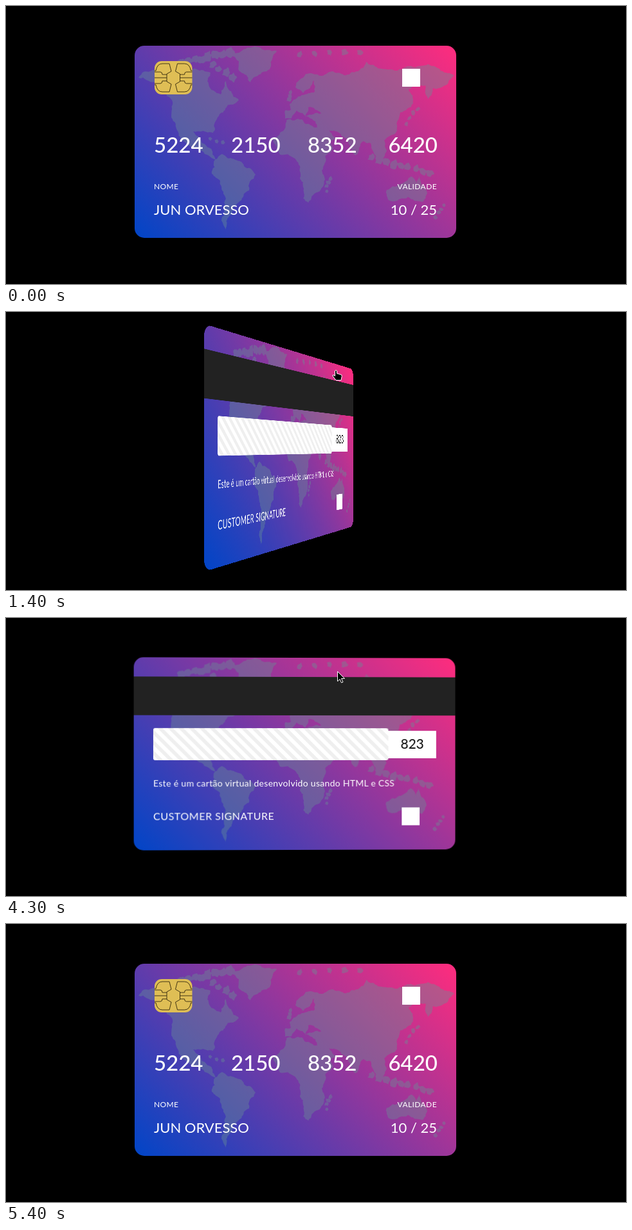
An HTML page that plays this animation: 964x434 px, repeating every 7200 ms.

```html
<!DOCTYPE html>
<html lang="pt">
<head>
<meta charset="utf-8">
<title>Cartão virtual</title>
<style>
  html, body { margin: 0; width: 100%; height: 100%; overflow: hidden; background: #000; }
  .stage { position: absolute; left: 0; top: 0; width: 964px; height: 434px; overflow: hidden; }
  .scene { position: absolute; left: 200px; top: 62px; width: 500px; height: 300px; perspective: 1000px; }
  .face {
    position: absolute; inset: 0; overflow: hidden; border-radius: 15px;
    backface-visibility: hidden;
    background: linear-gradient(45deg, #0045c7, #ff2c7d);
  }
  .face svg { position: absolute; left: 0; top: 0; }
  .strip {
    position: absolute; left: 30px; top: 110px; width: 365px; height: 50px; border-radius: 3px;
    background: repeating-linear-gradient(45deg, #fff 0 5.2px, #efefef 6px 10.8px, #fff 11.4px);
  }
  .cursor { position: absolute; left: 0; top: 0; }
  text { font-family: Lato, "Open Sans", sans-serif; fill: #fff; }
  .number { font-size: 33px; font-weight: 500; }
  .label { font-size: 12px; letter-spacing: .4px; }
  .value { font-size: 22px; }
  .end { text-anchor: end; }
</style>
</head>
<body>
<div class="stage">
  <div class="scene">
    <div class="face" id="front">
      <svg width="500" height="300" viewBox="200 62 500 300">
        <defs>
          <path id="map" fill="#688e94" opacity=".4"/>
          <path id="contacts" d="M231 101H233Q235 90 243 90H254L257 102 250 106V118L257 122 254 134H243Q235 134 233 123H231M231 103H240Q243 103 243 107H250M231 112H250M231 121H240Q243 121 243 117H250"/>
        </defs>
        <use href="#map"/>
        <rect x="231" y="86" width="58.5" height="52" rx="11" fill="#dfbe55"/>
        <g fill="none" stroke="#33280c" stroke-width=".9">
          <use href="#contacts"/>
          <use href="#contacts" transform="translate(520.5) scale(-1 1)"/>
        </g>
        <rect x="616" y="98" width="28" height="28" fill="#fff"/>
        <g class="number">
          <text x="230" y="229">5224</text>
          <text x="350" y="229">2150</text>
          <text x="469" y="229">8352</text>
          <text class="end" x="671" y="229">6420</text>
        </g>
        <text class="label" x="230" y="286">NOME</text>
        <text class="label end" x="670" y="286">VALIDADE</text>
        <text class="value" x="230" y="326">JUN ORVESSO</text>
        <text class="value end" x="670" y="326">10 / 25</text>
      </svg>
    </div>
    <div class="face" id="back">
      <svg width="500" height="300" viewBox="200 62 500 300">
        <use href="#map"/>
        <rect x="200" y="92" width="500" height="60" fill="#222"/>
        <rect x="594" y="176" width="76" height="43" fill="#fff"/>
        <text x="632.5" y="204" text-anchor="middle" style="font-size:21px;fill:#000">823</text>
        <text x="230" y="263" style="font-size:14px;letter-spacing:.3px">Este é um cartão virtual desenvolvido usando HTML e CSS</text>
        <text x="230" y="315" style="font-size:16px;letter-spacing:.5px">CUSTOMER SIGNATURE</text>
        <rect x="616" y="296" width="28" height="28" fill="#fff"/>
      </svg>
      <div class="strip"></div>
    </div>
  </div>
  <svg class="cursor" width="964" height="434">
    <g id="pointer" fill="#000" stroke="#fff" stroke-linejoin="round">
      <path id="arrow" d="M.5 .5V16L4 12.5 6.5 18 9 17 6.5 11.5H11.5Z"/>
      <path id="hand" transform="translate(-6)" d="M4.5 1.8Q6 0 7.5 1.8V6L13 7.5Q15.8 8 15.2 10.5L14 16.5H6L1.2 10Q.4 8.4 2 8.2L4.5 10Z"/>
    </g>
  </svg>
</div>
<script>
const LOOP = 7200, STEP = 100;
const byId = id => document.getElementById(id);

let seed = 11;
const random = () => (seed = seed * 16807 % 2147483647) / 2147483647;
const jitter = size => (random() - .5) * size;

// Corner points only; coast() adds the ragged shoreline.
const continents = {
  northAmerica: '206,112 228,100 318,104 315,122 334,138 342,117 362,147 333,168 322,198 291,196 304,213 326,240 281,216 257,174 258,147 232,119',
  greenland: '348,72 392,64 421,70 412,94 380,119 362,86',
  southAmerica: '325,240 336,231 370,250 388,263 378,288 353,316 342,349 335,335 338,290 320,262',
  africa: '416,207 436,178 460,177 493,190 509,222 493,252 496,271 470,307 462,300 457,268 449,238 426,232',
  eurasia: '434,176 434,163 443,162 441,153 460,139 480,134 478,116 462,136 450,127 466,106 490,109 560,87 697,109 664,128 656,145 652,124 626,130 633,152 613,166 608,195 588,210 592,226 583,246 567,214 556,211 543,233 530,207 502,194 514,206 491,222 481,180 466,172 490,168 470,158 466,176 452,163 444,175',
  australia: '592,287 630,266 638,277 642,265 655,292 647,306 625,298 597,304'
};

// Island chains: start x, y, end x, y, count, size
const chains = [
  [272, 89, 348, 72, 8, 13], [322, 92, 350, 110, 4, 11], [458, 76, 550, 72, 5, 8],
  [443, 134, 440, 146, 3, 6], [504, 269, 498, 288, 4, 6], [640, 160, 622, 183, 4, 6],
  [568, 236, 660, 262, 9, 11], [681, 310, 667, 330, 4, 6], [318, 208, 338, 214, 3, 5]
];

// Midpoint displacement along one edge
function ragged([ax, ay], [bx, by]) {
  const length = Math.hypot(bx - ax, by - ay);
  if (length < 4) return [[bx, by]];
  const k = jitter(.34);
  const mid = [(ax + bx) / 2 - (by - ay) * k, (ay + by) / 2 + (bx - ax) * k];
  return [...ragged([ax, ay], mid), ...ragged(mid, [bx, by])];
}

function coast(corners) {
  const shore = corners.flatMap((p, i) => ragged(p, corners[(i + 1) % corners.length]));
  return 'M' + shore.map(p => p.map(v => v.toFixed(1))).join(' ') + 'Z';
}

function island(x, y, size) {
  const corners = [0, 1, 2, 3, 4].map(i => {
    const angle = i * Math.PI * .4, r = size * (.4 + random() * .4);
    return [x + r * Math.cos(angle), y + r * Math.sin(angle)];
  });
  return coast(corners);
}

function drawMap() {
  const parts = Object.values(continents)
    .map(list => coast(list.split(' ').map(p => p.split(',').map(Number))));
  for (const [x0, y0, x1, y1, count, size] of chains)
    for (let i = 0; i < count; i++) {
      const k = i / (count - 1);
      parts.push(island(mix(x0, x1, k) + jitter(size / 3), mix(y0, y1, k) + jitter(size / 3), size));
    }
  byId('map').setAttribute('d', parts.join(''));
}

const mix = (a, b, k) => a + (b - a) * k;
const progress = (t, from, to) => Math.min(1, Math.max(0, (t - from) / (to - from)));

// CSS "ease": cubic-bezier(.25, .1, .25, 1)
function ease(x) {
  if (x <= 0 || x >= 1) return x;
  const bezier = (a, b, s) => 3 * a * s * (1 - s) ** 2 + 3 * b * s * s * (1 - s) + s ** 3;
  let low = 0, high = 1;
  for (let i = 0; i < 24; i++) {
    const mid = (low + high) / 2;
    if (bezier(.25, .25, mid) < x) low = mid; else high = mid;
  }
  return bezier(.1, 1, low);
}

// The pointer drops in, slides onto the card, rests, and leaves over the top.
function pointerAt(t) {
  const drop = progress(t, 500, 600);
  const enter = 1 - (1 - progress(t, 700, 1400)) ** 1.3;
  const leave = progress(t, 4200, 4600) ** 2;
  return [536 - 23 * enter + 27 * leave, 7 + 9 * drop + 74 * enter - 112 * leave];
}

function render(time) {
  const t = Math.floor(time % LOOP / STEP) * STEP;
  const turn = 180 * (ease(progress(t, 1010, 2050)) - ease(progress(t, 4283, 5400)));
  byId('front').style.transform = `rotateY(${-turn}deg)`;
  byId('back').style.transform = `rotateY(${180 - turn}deg)`;

  const overCard = t >= 1000 && t < 4300;
  byId('pointer').style.display = t >= 500 && t < 4600 ? '' : 'none';
  byId('pointer').setAttribute('transform', `translate(${pointerAt(t).map(Math.round)})`);
  byId('hand').style.display = overCard ? '' : 'none';
  byId('arrow').style.display = overCard ? 'none' : '';
}

drawMap();
const start = performance.now();
function tick() {
  render(performance.now() - start);
  requestAnimationFrame(tick);
}
tick();
</script>
</body>
</html>
```
